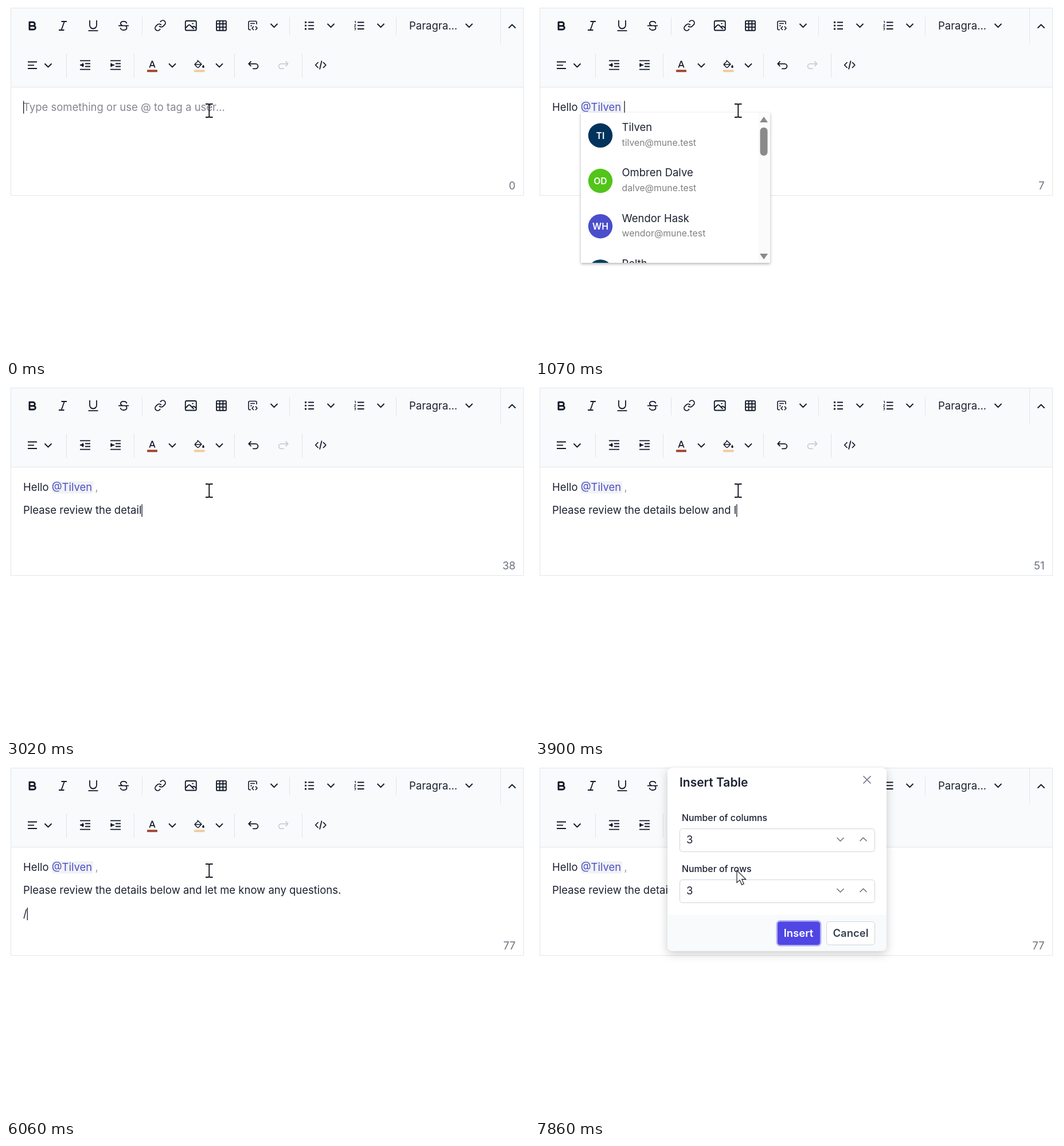
Animation, 912 px wide and 614 px high, one loop 8000 ms. Source, as an HTML page:

```html
<!DOCTYPE html>
<html lang="en">
<head>
<meta charset="utf-8">
<title>Rich text editor</title>
<style>
  html, body { margin: 0; width: 100%; height: 100%; overflow: hidden; background: #fff; }
  svg { display: block; width: 912px; height: 614px; font: 18.48px Inter, "Liberation Sans", sans-serif; font-optical-sizing: none; }
  text { white-space: pre; fill: #1b2130; }
  .icon { fill: none; stroke: #111827; stroke-width: 1.8; stroke-linejoin: round; stroke-linecap: butt; }
  .solid { fill: #111827; stroke: none; }
  .line { stroke: #e2e5e9; fill: none; }
  .muted { fill: #6b7280; }
  .hint { fill: #85858f; }
  .small { font-size: 15.84px; }
  .mail { font-size: 15.84px; fill: #808080; }
  .tiny { font-size: 14.4px; }
  .title { font-size: 21px; }
  .medium { font-weight: 500; }
  .semi { font-weight: 600; }
  .mid { text-anchor: middle; }
  .white { fill: #fff; }
  .bar { fill: #8a8a8a; }
  .popup { filter: drop-shadow(0 2px 2.5px rgba(0, 0, 0, .3)); }
  .dialog { filter: drop-shadow(0 5px 8px rgba(0, 0, 0, .2)); }
  .field { fill: #fff; stroke: #cfd3da; }
  .ring { fill: none; stroke: #b3aff4; stroke-width: 2.5; }
  .edge { fill: none; stroke: #4f46e5; stroke-width: 1.3; }
  .grey { stroke: #6b7280; stroke-width: 1.6; }
</style>
</head>
<body>
<svg viewBox="0 0 912 614" xmlns="http://www.w3.org/2000/svg">
  <defs>
    <path id="down" d="M-6-3 0 3 6-3"/>
    <path id="up" d="M-6 3 0-3 6 3"/>
    <g id="grid"><rect x="-8" y="-8" width="16" height="16" rx="1"/><path d="M-8-3H8M-8 2.5H8M-2.7-8V8M2.7-8V8"/></g>
    <clipPath id="listClip"><rect x="80" y="186" width="330" height="262"/></clipPath>
  </defs>

  <!-- editor frame -->
  <rect x="8.5" y="3.5" width="894" height="327" fill="#fff"/>
  <rect x="9" y="4" width="893" height="137" fill="#f8fafc"/>
  <path class="line" d="M8.5 3.5h894v327H8.5zM9 141.5h893M862.5 4v62M237.5 19v32M494.5 19v32M680.5 19v32M105.5 83v42M223.5 83v42M398.5 83v42M516.5 83v42"/>

  <!-- toolbar, first row -->
  <g class="icon">
    <path stroke-width="2.9" d="M41 28.2h6a3.3 3.3 0 0 1 0 6.6H41zM41 34.8h7.2a3.1 3.1 0 0 1 0 6.2H41z"/>
    <path d="M96.5 27h9.5M92 42h9.5M101.8 27l-5.3 15"/>
    <path d="M146 25v8.5a6 6 0 0 0 12 0V25M143.5 43.2h17"/>
    <path d="M210.5 30.5c-.4-2.5-2.7-3.7-5.4-3.7-3 0-5.2 1.5-5.2 3.8 0 1.7 1 2.8 3 3.4M196 34.3h18M199.6 38c.3 2.6 2.6 4 5.6 4 3.1 0 5.4-1.5 5.4-4 0-1.7-.9-2.9-2.4-3.7"/>
    <path stroke-width="2" transform="translate(258.2 23.2) scale(.9)" d="M10 13a5 5 0 0 0 7.54.54l3-3a5 5 0 0 0-7.07-7.07l-1.72 1.71M14 11a5 5 0 0 0-7.54-.54l-3 3a5 5 0 0 0 7.07 7.07l1.71-1.71"/>
    <rect x="312.8" y="26" width="19" height="16.5" rx="2"/>
    <path d="M313 38.5l5-5q1.5-1.3 3 0l6.5 6.5M324.5 37.3l1.3-1.3q1.5-1.3 3 0l3 2.8"/>
    <circle class="solid" cx="325.6" cy="30.6" r="1.2"/>
    <use href="#grid" transform="translate(375.5 34.3) scale(1.05)"/>
    <g stroke-width="1.6">
      <path d="M437 32v-3.5a2 2 0 0 0-2-2h-10a2 2 0 0 0-2 2v11a2 2 0 0 0 2 2h2M426 30.5h8M426 34.5h3"/>
      <path d="M432 35.5l-3 3.2 3 3.3M435 35.5l3 3.2-3 3.3"/>
    </g>
    <path d="M527 28.5h10M527 34.2h10M527 40h10"/>
    <path d="M521 28.5h3M521 34.2h3M521 40h3" stroke-width="2.8"/>
    <path d="M613 28.5h11.5M613 34.2h11.5M613 40h11.5"/>
    <path d="M608 27l1.3-.8v4M607.5 32.5h2.5l-2.5 3.5h2.8M607.5 38.5h2.5l-1.3 1.5c2 0 1.5 2.3-1.2 1.8" stroke-width="1"/>
    <use href="#down" x="467.5" y="34"/><use href="#down" x="566.5" y="34"/>
    <use href="#down" x="653.5" y="34"/><use href="#down" x="807.5" y="34"/>
    <use href="#up" x="882.5" y="35.5"/>
  </g>
  <text x="703" y="41">Paragra...</text>

  <!-- toolbar, second row -->
  <g class="icon">
    <path d="M38 97.5h16M38 103.3h11M38 109h16"/>
    <path id="lines" d="M129 95.3h18M138 100.5h9M138 105.5h9M129 110.7h18"/>
    <use href="#lines" x="53"/>
    <path class="solid" d="M129.5 103l5.5-4v8zM188 103l-5.5-4v8z"/>
    <path d="M129 103h7M182 103h7"/>
    <path d="M250.3 107.5l4.2-11h1l4.2 11M252 103.8h6"/>
    <path stroke-width="1.5" d="M333.5 94.5l7.5 7-5.2 5.5q-1 1-2 0l-4-4q-1-1 0-2l5.5-5.2M329.5 102h11"/>
    <path class="solid" d="M344 102.5c3 3.5 1.5 5.5 0 5.5s-3-2 0-5.5"/>
    <path d="M427.5 96.5l-4.3 4.3 4.3 4.3M423.5 100.8h11.7a4.2 4.2 0 0 1 0 8.5h-5"/>
    <path stroke="#c9cdd3" d="M487.5 96.5l4.3 4.3-4.3 4.3M491.5 100.8h-11.7a4.2 4.2 0 0 0 0 8.5h5"/>
    <path d="M544.5 98l-4.8 5 4.8 5M553 98l4.8 5-4.8 5M550.6 95.5l-3.6 15"/>
    <use href="#down" x="73.5" y="103.5"/><use href="#down" x="290" y="103.5"/><use href="#down" x="372" y="103.5"/>
  </g>
  <rect x="246" y="111.3" width="18" height="4" rx="1" fill="#a1462f"/>
  <rect x="328" y="111.3" width="18.5" height="4" rx="1" fill="#f2cb9d"/>

  <!-- content -->
  <text id="hint" class="hint" x="30" y="183">Type something or use @ to tag a user...</text>
  <rect id="chip" x="80" y="166" width="72" height="21.5" rx="3" fill="#f1f2f5"/>
  <text id="row0" x="30" y="183"><tspan></tspan><tspan fill="#4c50c6"></tspan><tspan fill="#9799ad"></tspan></text>
  <text id="row1" x="30" y="223.3"></text>
  <text id="row2" x="30" y="264"></text>
  <rect id="caret" width="1.3" height="22" fill="#111827"/>
  <text id="count" class="muted" x="888.5" y="320" text-anchor="end"></text>

  <g id="people" class="popup"></g>
  <g id="menu" class="popup"></g>
  <g id="found" class="popup"></g>

  <g id="dialog">
    <rect class="dialog" x="231" y="3" width="382" height="319.5" rx="8" fill="#fff"/>
    <path d="M231 260h382v54.5a8 8 0 0 1-8 8H239a8 8 0 0 1-8-8z" fill="#f8fafc"/>
    <text class="title semi" x="252" y="36">Insert Table</text>
    <path class="icon grey" d="M572.5 17.5l13 13M585.5 17.5l-13 13"/>
    <g id="fields"></g>
    <rect x="422.5" y="271" width="75" height="41.5" rx="5" fill="#4f46e5"/>
    <rect id="ring2" class="ring" x="421.8" y="270.3" width="76.4" height="43" rx="5.5"/>
    <text class="semi mid white" x="459.5" y="298">Insert</text>
    <rect class="field" x="508.5" y="271.5" width="84" height="40.5" rx="5"/>
    <text class="semi mid" x="550.5" y="298" style="fill:#374151">Cancel</text>
  </g>

  <path id="beam" fill="none" stroke="#16181f" stroke-width="1.9" d="M348 171h4.5q1.8 0 1.8 2 0-2 1.8-2h4.5M348 194h4.5q1.8 0 1.8-2 0 2 1.8 2h4.5M354.3 172v21"/>
  <path id="arrow" fill="#fff" stroke="#222" stroke-width="1.2" d="M352 182v21.5l5-4.6 3.6 8.2 3.6-1.6-3.6-7.8h7z"/>
</svg>

<script>
const $ = id => document.getElementById(id);
const LOOP = 8000;
const GREETING = 'Hello @';
const NAME = 'Tilven';
const BODY = 'Please review the details below and let me know any questions.';

// [time, characters typed in the second line]
const PACE = [[1450, 0], [1520, 1], [2080, 9], [2950, 23], [3020, 24], [3770, 36], [3840, 37],
  [4620, 49], [4680, 50], [4770, 51], [5480, 60], [5540, 61], [5600, 62]];

// [time, characters in the third line]
const SLASH = [[6060, 1], [6340, 2], [6405, 3], [6470, 4], [7180, 0]];

const people = [
  [NAME, 'tilven@mune.test', 'TI', '#02335d'],
  ['Ombren Dalve', 'dalve@mune.test', 'OD', '#52c41a'],
  ['Wendor Hask', 'wendor@mune.test', 'WH', '#4a4ecb'],
  ['Pelth', 'pelth@mune.test', 'PE', '#02405f']
];

const scrollbar = (x, top, bottom, thumb) => `
  <rect x="${x - 10}" y="${top}" width="21" height="${bottom - top}" fill="#fbfbfb"/>
  <path class="bar" d="M${x - 7} ${top + 17}l7-10 7 10zM${x - 7} ${bottom - 16}l7 10 7-10z"/>
  <rect class="bar" x="${x - 6.5}" y="${top + 26}" width="13" height="${thumb}" rx="6"/>`;

const person = ([name, mail, initials, color], i) => `
  <g transform="translate(0 ${i * 79.2})">
    <circle cx="114" cy="225.8" r="21.2" fill="${color}"/>
    <text class="small semi mid white" x="114" y="231.5">${initials}</text>
    <text x="151.5" y="218.3">${name}</text>
    <text class="mail" x="151.5" y="244">${mail}</text>
  </g>`;

$('people').innerHTML = `<rect x="80" y="186" width="330" height="262" fill="#fff"/>
  <g clip-path="url(#listClip)"><rect id="active" x="80" y="186" width="309" height="79" fill="#e5e7eb"/>
  ${people.map(person).join('')}</g>${scrollbar(399, 186, 448, 49)}`;

const icons = {
  table: '<use href="#grid" transform="translate(75 344.5) scale(.9)"/>',
  para: '<path d="M80 337h-6a3.5 3.5 0 0 0 0 7h2M76 337v15M79.5 337v15"/>'
};
const heading = n => `<path d="M68 338v13M77 338v13M68 344.5h9"/><text class="solid" x="79" y="351" font-size="10">${n}</text>`;

const block = (icon, title, note, i) => `
  <g transform="translate(0 ${i * 69})">
    <g class="icon" stroke-width="1.5">${icon}</g>
    <text class="medium" x="125.5" y="337">${title}</text>
    <text class="tiny" x="125.5" y="363">${note}</text>
  </g>`;

const card = (height, id, inner) => `<rect x="30" y="268" width="397" height="${height}" fill="#fff"/>
  <rect id="${id}" x="30" y="310" width="397" height="69.5" fill="#e5e7eb"/>
  <text class="medium" x="46" y="295.5">Basic Block</text>${inner}`;

$('menu').innerHTML = card(419, 'first',
  block(icons.para, 'Paragraph', 'Add a paragraph.', 0) +
  [1, 2, 3, 4].map(n => block(heading(n), 'Heading ' + n, `Add a heading level ${n}.`, n)).join('') +
  scrollbar(416, 268, 687, 210));
$('found').innerHTML = card(111.5, 'hit', block(icons.table, 'Table', 'Insert a table.', 0));

$('fields').innerHTML = ['columns', 'rows'].map((label, i) => `
  <g transform="translate(0 ${i * 89})">
    <text class="small medium" x="256" y="96">Number of ${label}</text>
    <rect class="field" x="252.5" y="109.5" width="340" height="40" rx="5"/>
    <g id="ring${i}"><rect class="ring" x="251.5" y="108.5" width="342" height="42" rx="6"/>
      <rect class="edge" x="252.5" y="109.5" width="340" height="40" rx="5"/></g>
    <text x="264" y="135">3</text>
    <g class="icon grey"><use href="#down" x="532.5" y="128"/><use href="#up" x="572.5" y="128"/></g>
  </g>`).join('');

const rows = [0, 1, 2].map(i => $('row' + i));
const [hello, tag, comma] = rows[0].children;

const fade = (id, opacity) => {
  $(id).style.display = opacity ? '' : 'none';
  $(id).style.opacity = opacity;
};
const show = (id, on) => fade(id, on ? 1 : 0);

// value of the last [time, value] pair that has been reached
const step = (keys, t, start = 0) => keys.reduce((v, [at, next]) => t >= at ? next : v, start);

function typed(t) {
  if (t < PACE[0][0]) return 0;
  for (let i = 1; i < PACE.length; i++) {
    const [a, from] = PACE[i - 1], [b, to] = PACE[i];
    if (t < b) return Math.floor(from + (to - from) * (t - a) / (b - a));
  }
  return BODY.length;
}

function draw(t) {
  const greet = t < 70 ? 0 : Math.min(7, Math.floor((t - 70) / 72.5) + 1);
  const tagged = t >= 1070;
  const n = typed(t);
  const slash = step(SLASH, t);

  show('hint', !greet);
  show('chip', tagged);
  hello.textContent = GREETING.slice(0, tagged ? 6 : greet);
  tag.textContent = tagged ? '@' + NAME : '';
  comma.textContent = !tagged ? '' : t < 1380 ? ' ' : ' ,';
  rows[1].textContent = BODY.slice(0, n);
  rows[2].textContent = '/tab'.slice(0, slash);

  const at = t < 1450 ? 0 : t < 5990 ? 1 : 2;
  $('caret').setAttribute('x', 30 + (rows[at].textContent ? rows[at].getComputedTextLength() : 0));
  $('caret').setAttribute('y', 165.6 + at * 40.7);
  show('caret', t < 7180);

  $('count').textContent = t < 1310 ? greet : t < 1380 ? 13
    : 14 + n + (t >= 7180 ? 1 : slash + (t >= 6650 ? 1 : 0));

  fade('people', step([[580, .4], [650, .9], [790, 1], [1310, 0]], t));
  show('active', t < 1070);
  fade('menu', step([[6130, .5], [6200, 1], [6650, 0]], t));
  show('found', t >= 6650 && t < 7180);
  show('hit', t >= 6790);

  fade('dialog', step([[7180, .6], [7300, 1]], t));
  const focus = step([[7650, 1], [7860, 2]], t);
  for (let i = 0; i < 3; i++) show('ring' + i, focus === i);
  show('beam', t < 7300);
  show('arrow', t >= 7300);
}

const begin = performance.now();
function tick() {
  draw((performance.now() - begin) % LOOP);
  requestAnimationFrame(tick);
}
tick();
</script>
</body>
</html>
```
